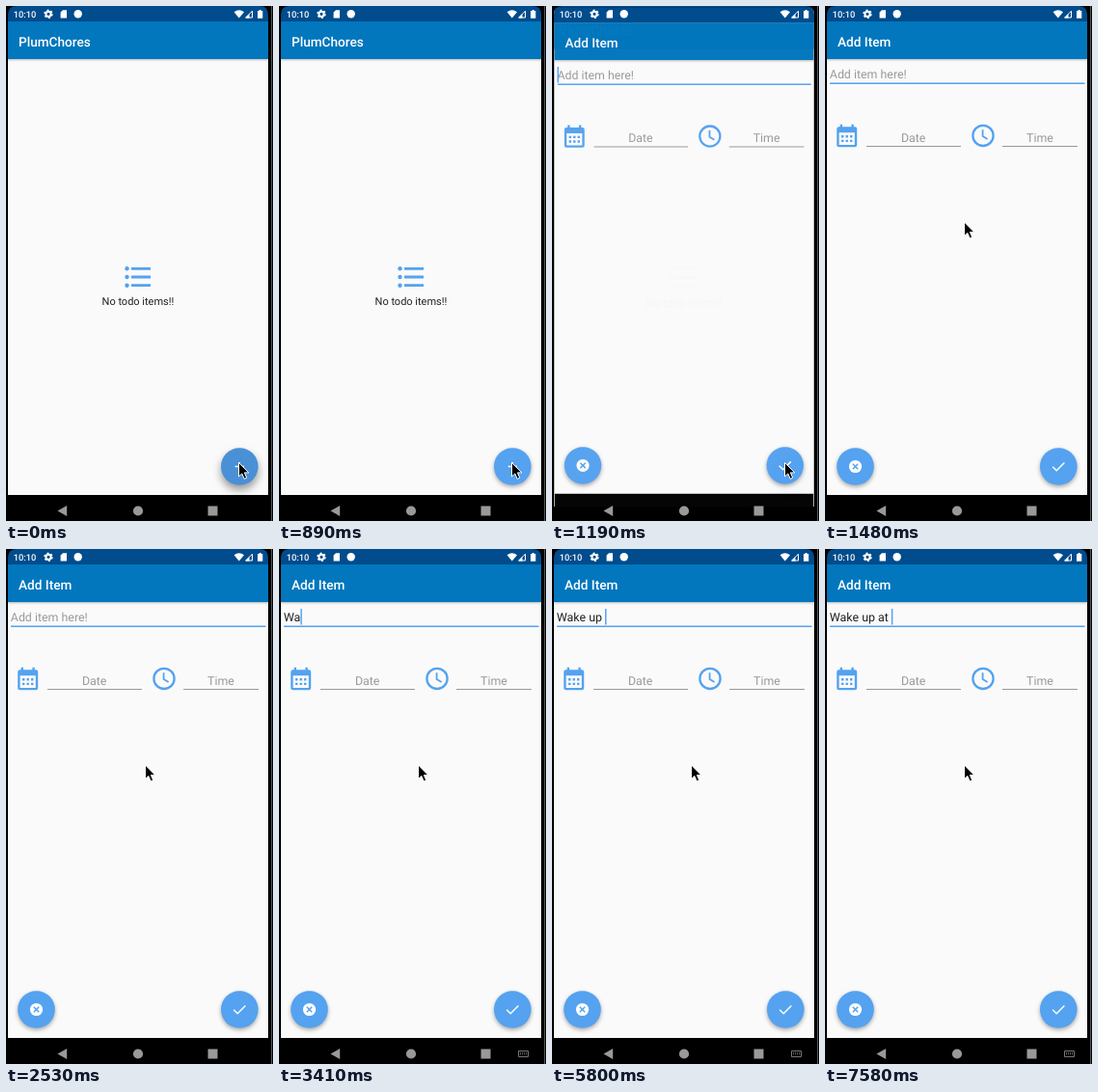
An HTML page that plays this animation: 277x534 px, repeating every 8 s.

```html
<!DOCTYPE html>
<html lang="en">
<head>
<meta charset="utf-8">
<title>Todo app</title>
<style>
  html, body { margin: 0; width: 100%; height: 100%; overflow: hidden; background: #000; }
  svg { display: block; width: 100%; height: 100%; font: 12.4px Roboto, sans-serif; text-rendering: geometricPrecision; }
  text { white-space: pre; }
  .bar { fill: #0277bd; filter: drop-shadow(0 1px 1px #0004); }
  .title { font-size: 13.6px; font-weight: 500; fill: #fff; }
  .hint { fill: #9a9a9a; }
  .mid { text-anchor: middle; }
  .accent { fill: #54a2f0; }
  .line { fill: none; stroke: #fff; stroke-width: 1.5; }
  .fab { fill: #54a2f0; filter: drop-shadow(0 2.5px 2px #0005); }
  .fab.raised { filter: drop-shadow(0 5px 4px #0006); }
</style>
</head>
<body>
<svg viewBox="0 0 277 534">
  <defs>
    <clipPath id="screen"><path d="M2 534V9Q2 0 11 0H263Q272 0 272 9V534Z"/></clipPath>
    <g id="frame">
      <path fill="#000" d="M2 0H272V534H2Z"/>
      <path fill="#fafafa" d="M2 16H272V507H2Z"/>
      <path fill="#004c8c" d="M2 0H272V16H2Z"/>
      <path class="bar" d="M2 16H272V55H2Z"/>
    </g>
  </defs>

  <path fill="#000" d="M0 0H277V534H0Z"/>
  <path fill="#555" d="M275 0H276V534H275Z"/>

  <g clip-path="url(#screen)">
    <g id="list">
      <use href="#frame"/>
      <text class="title" x="13" y="41.5">PlumChores</text>
      <g class="accent">
        <circle cx="125.5" cy="272.3" r="2.2"/><circle cx="125.5" cy="281" r="2.2"/><circle cx="125.5" cy="289.7" r="2.2"/>
        <path d="M130 270.9h20v2.8h-20zM130 279.6h20v2.8h-20zM130 288.3h20v2.8h-20z"/>
      </g>
      <text class="mid" x="137" y="310" font-size="11" fill="#222">No todo items!!</text>
      <circle id="addButton" class="fab" cx="242.3" cy="477.5" r="19.3"/>
      <path class="line" d="M237.7 477.5h9.2M242.3 472.9v9.2"/>
    </g>

    <g id="form">
      <use href="#frame"/>
      <text class="title" x="13" y="41.5">Add Item</text>
      <text id="hint" class="hint" x="4.8" y="75">Add item here!</text>
      <text id="entry" x="4.8" y="75" fill="#222"></text>
      <path class="accent" d="M5 79.5H269.5V81H5Z"/>
      <rect id="caret" class="accent" y="62" width="1.5" height="16.5"/>

      <path class="accent" fill-rule="evenodd" d="M14.4 125.2H15.6V122.8H18V125.2H27.4V122.8H29.8V125.2H31Q33.2 125.2 33.2 127.4V144Q33.2 146.2 31 146.2H14.4Q12.2 146.2 12.2 144V127.4Q12.2 125.2 14.4 125.2ZM14.6 131.2V143.9H30.8V131.2Z"/>
      <path class="accent" d="M17 134h2.4v2.4H17zM21.5 134h2.4v2.4h-2.4zM26 134h2.4v2.4H26zM17 138.7h2.4v2.4H17zM21.5 138.7h2.4v2.4h-2.4zM26 138.7h2.4v2.4H26z"/>
      <g fill="none" stroke="#54a2f0" stroke-width="2.3">
        <circle cx="164" cy="134.4" r="10.6"/>
        <path stroke-width="1.8" d="M163.6 128.2V135l5 3"/>
      </g>
      <text class="hint mid" x="91.7" y="140.5">Date</text>
      <text class="hint mid" x="223" y="140.5">Time</text>
      <path fill="#999" d="M43 145H141V146H43ZM184 145H262V146H184Z"/>

      <circle class="fab" cx="31.5" cy="477.5" r="19.3"/>
      <circle cx="31.5" cy="477.5" r="6.6" fill="#fff"/>
      <path class="line" style="stroke:#54a2f0" d="M28.8 474.8l5.4 5.4m0-5.4l-5.4 5.4"/>
      <circle class="fab" cx="242.3" cy="477.5" r="19.3"/>
      <path class="line" d="M236.2 477.8l4 4 8.2-8.4"/>
    </g>

    <g id="status" fill="#fff">
      <text x="7.8" y="12" font-size="9.3" font-weight="500">10:10</text>
      <circle cx="44" cy="8.3" r="2.6" fill="none" stroke="#fff" stroke-width="2"/>
      <circle cx="44" cy="8.3" r="4" fill="none" stroke="#fff" stroke-width="1.4" stroke-dasharray="2.1 2.09"/>
      <path d="M59 4.2H63V12.6H56.6V6.6Z"/>
      <circle cx="74.7" cy="8.3" r="4.2"/>
      <path d="M236.6 6.2Q241.8 2.4 247 6.2L241.8 12.6Z"/>
      <path fill="none" stroke="#fff" d="M255.5 5.2V12H248.7Z"/>
      <path d="M252.5 8V12.4H248.2Z"/>
      <path d="M261 5H262.7V4H264.6V5H266.3V12.8H261Z"/>
    </g>
    <g fill="#999">
      <path d="M53.5 523.5L63.2 518V529Z"/>
      <circle cx="137" cy="523.5" r="5.1"/>
      <path d="M209.5 518.5H219.5V528.5H209.5Z"/>
    </g>
    <g id="keyboard" fill="none" stroke="#777">
      <path d="M248.5 520.5H258.5V526.5H248.5Z"/>
      <path stroke-dasharray="1 1" d="M250 522.5h7.5M250 524h7.5"/>
    </g>
  </g>

  <path id="pointer" fill="#000" stroke="#fff" stroke-width="1" d="M0 0V14.4L3.3 11.4L5.7 16.8L8.2 15.7L5.9 10.4H10.3Z"/>
</svg>

<script>
const LOOP = 8000;
const $ = id => document.getElementById(id);

// [start ms, list scale, form scale, form opacity]
const transition = [[0, 1, .9, 0], [1040, 1.025, .93, .44], [1190, 1.05, .995, .98], [1330, 1, 1, 1]];

// [start ms, typed text, caret visible]
const typing = [
  [0, '', 1], [1480, '', 0], [1930, '', 1], [2530, '', 0], [2970, '', 1],
  [3270, 'W', 1], [3410, 'Wa', 1], [3860, 'Wa', 0], [4150, 'Wake', 1], [4750, 'Wake', 0],
  [5200, 'Wake ', 1], [5350, 'Wake u', 1], [5500, 'Wake up', 1], [5800, 'Wake up ', 1],
  [6240, 'Wake up a', 1], [6390, 'Wake up at', 1], [6530, 'Wake up at ', 1],
  [7130, 'Wake up at ', 0], [7580, 'Wake up at ', 1]
];

const stepAt = (steps, t) => steps.findLast(step => step[0] <= t);
const show = (id, on) => { $(id).style.display = on ? '' : 'none'; };
const zoom = (id, s) => $(id).setAttribute('transform', `translate(137 267) scale(${s}) translate(-137 -267)`);

function render(t) {
  const [, listScale, formScale, opacity] = stepAt(transition, t);
  zoom('list', listScale);
  zoom('form', formScale);
  $('form').style.opacity = opacity;
  show('list', t < 1330);
  $('addButton').style.fill = t < 290 ? '#4a90d6' : '';
  $('addButton').classList.toggle('raised', t < 890);

  const [, text, caretOn] = stepAt(typing, t);
  if ($('entry').textContent !== text) $('entry').textContent = text;
  show('hint', !text);
  show('caret', caretOn);
  $('caret').setAttribute('x', 4.8 + (text ? $('entry').getComputedTextLength() : 0));

  show('keyboard', t >= 3120);
  $('pointer').setAttribute('transform', t < 1480 ? 'translate(241.5 473.5)' : 'translate(144.5 224)');
}

function tick() {
  render(performance.now() % LOOP);
  requestAnimationFrame(tick);
}
tick();
</script>
</body>
</html>
```
